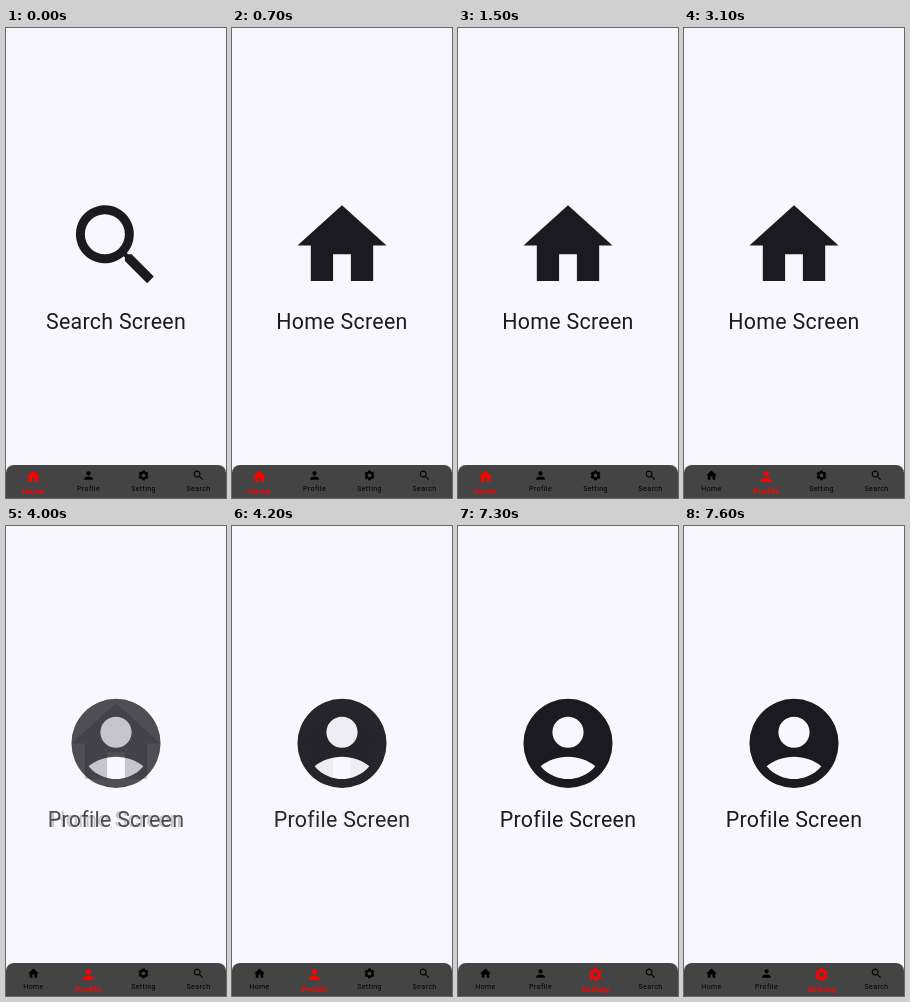
An HTML page that plays this animation: 220 px wide and 470 px high, repeating every 8000 ms.

```html
<!DOCTYPE html>
<html lang="en">
<head>
<meta charset="utf-8">
<title>Bottom navigation</title>
<style>
  html, body { margin: 0; width: 100%; height: 100%; overflow: hidden; background: #f8f7ff; }
  svg { display: block; width: 220px; height: 470px; }
  text { font-family: Roboto, sans-serif; text-anchor: middle; }
  .screen { fill: #1b1a23; }
  .screen text { font-size: 21.4px; letter-spacing: .27px; }
  .tab text { font-size: 7px; letter-spacing: .4px; }
  .tab.selected { fill: #f00; }
  .tab.selected text { font-size: 8px; font-weight: 700; }
</style>
</head>
<body>
<svg id="stage" viewBox="0 0 220 470">
  <rect width="220" height="470" fill="#f8f7ff"/>
  <g id="screens"></g>
  <path d="M0 470V445a8 8 0 0 1 8-8H212a8 8 0 0 1 8 8V470z" fill="#444"/>
  <g id="tabs"></g>
</svg>
<script>
const LOOP = 8000;
const icons = {
  Home: 'M10 20v-6h4v6h5v-8h3L12 3 2 12h3v8z',
  Person: 'M12 12c2.21 0 4-1.79 4-4s-1.79-4-4-4-4 1.79-4 4 1.79 4 4 4zm0 2c-2.67 0-8 1.34-8 4v2h16v-2c0-2.66-5.33-4-8-4z',
  Account: 'M12 2a10 10 0 1 0 0 20a10 10 0 1 0 0-20zM12 6a3.5 3.5 0 1 1 0 7a3.5 3.5 0 1 1 0-7zM12 20c-2.03 0-4.43-.82-6.14-2.88C7.55 15.8 9.68 15 12 15s4.45.8 6.14 2.12C16.43 19.18 14.03 20 12 20z',
  Search: 'M15.5 14h-.79l-.28-.27A6.5 6.5 0 1 0 13.73 14.43l.27.28v.79l5 4.99L20.49 19zM9.5 14a4.5 4.5 0 1 1 0-9a4.5 4.5 0 1 1 0 9z'
};

// A gear: one tooth outline repeated around a ring with a round hole.
function gearPath() {
  const polar = (radius, degrees) => {
    const a = degrees * Math.PI / 180;
    return (12 + radius * Math.cos(a)).toFixed(2) + ' ' + (12 + radius * Math.sin(a)).toFixed(2);
  };
  const points = [];
  for (let i = 0; i < 6; i++) {
    const a = i * 60 + 30;
    points.push(polar(7.4, a - 22), polar(9.7, a - 17), polar(9.7, a + 17), polar(7.4, a + 22));
  }
  // Rotated so that the flat teeth sit at the top and bottom.
  return 'M' + points.join('L') + 'zM12 8.4a3.6 3.6 0 1 0 0 7.2a3.6 3.6 0 1 0 0-7.2z';
}
icons.Setting = gearPath();

function add(parent, name, attributes, content = '') {
  const node = document.createElementNS('http://www.w3.org/2000/svg', name);
  for (const key in attributes) node.setAttribute(key, attributes[key]);
  node.textContent = content;
  parent.appendChild(node);
  return node;
}

const place = (x, y, size) =>
  `translate(${x - size / 2} ${y - size / 2}) scale(${size / 24})`;

const screens = {};
for (const [name, icon] of [['Search', 'Search'], ['Home', 'Home'], ['Profile', 'Account']]) {
  const group = add(document.getElementById('screens'), 'g', { class: 'screen' });
  add(group, 'path', { d: icons[icon], 'fill-rule': 'evenodd', transform: place(110, 217.4, 106.9) });
  add(group, 'text', { x: 110, y: 301 }, name + ' Screen');
  screens[name] = group;
}

const tabs = [['Home', 'Home'], ['Profile', 'Person'], ['Setting', 'Setting'], ['Search', 'Search']]
  .map(([name, icon], i) => {
    const x = 27.5 + 55 * i;
    const group = add(document.getElementById('tabs'), 'g', {});
    const mark = add(group, 'path', { d: icons[icon], 'fill-rule': 'evenodd' });
    const label = add(group, 'text', { x }, name);
    return { name, x, group, mark, label };
  });

// Opacity of each screen from the given time on.
const fades = [
  [0, { Search: 1 }],
  [700, { Home: 1 }],
  [4000, { Home: .22, Profile: .76 }],
  [4200, { Home: .04, Profile: .95 }],
  [4400, { Profile: 1 }]
];
const selections = [[0, 'Home'], [3100, 'Profile'], [7300, 'Setting']];
const valueAt = (steps, t) => steps.filter(step => step[0] <= t).pop()[1];

function render(t) {
  const opacity = valueAt(fades, t);
  for (const name in screens) screens[name].setAttribute('opacity', opacity[name] || 0);

  const selected = valueAt(selections, t);
  for (const tab of tabs) {
    const on = tab.name === selected;
    tab.group.setAttribute('class', on ? 'tab selected' : 'tab');
    tab.mark.setAttribute('transform', place(tab.x, on ? 448.7 : 447.4, on ? 16 : 12.8));
    tab.label.setAttribute('y', on ? 466 : 463);
  }
}

const start = performance.now();
function tick() {
  render((performance.now() - start) % LOOP);
  requestAnimationFrame(tick);
}
render(0);
requestAnimationFrame(tick);
</script>
</body>
</html>
```
